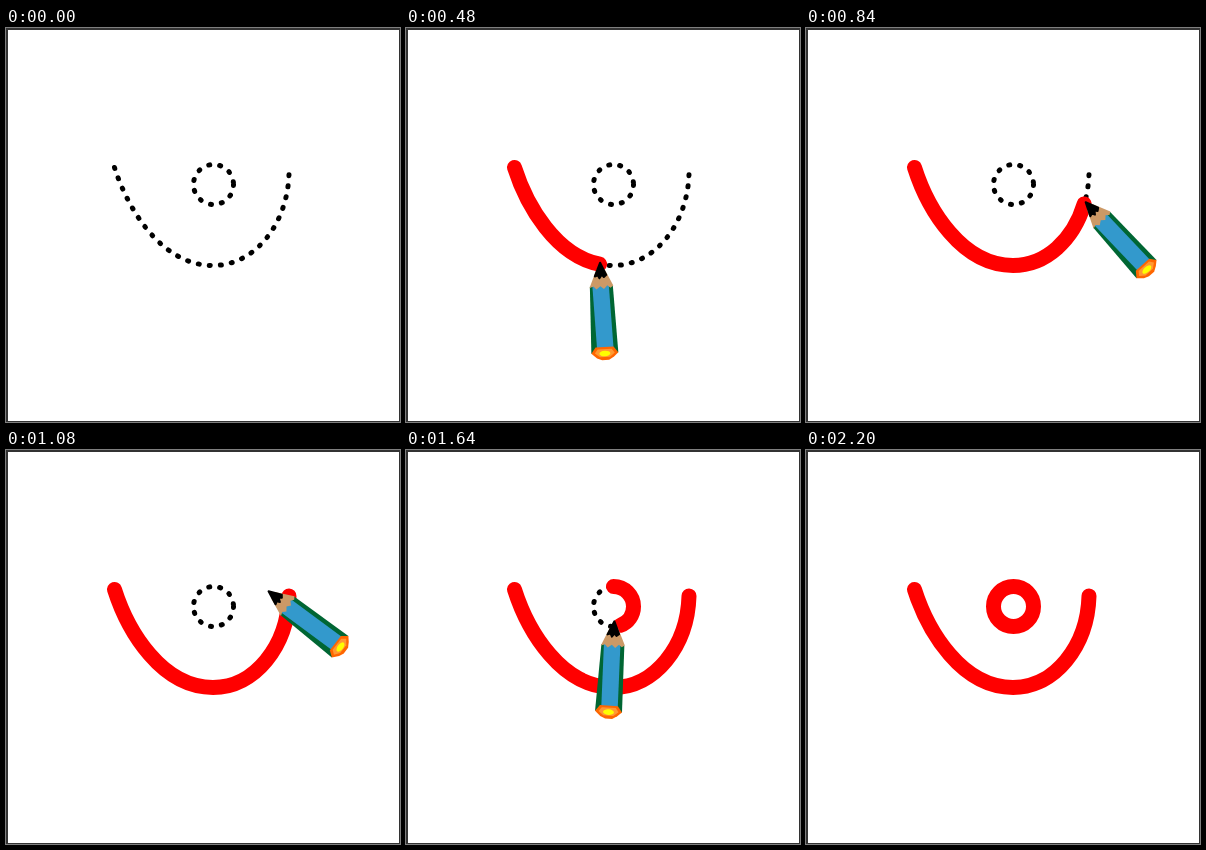
These frames come from a looping animation (394x394 px, 2240 ms). An HTML page:

```html
<!DOCTYPE html>
<html lang="en">
<head>
<meta charset="utf-8">
<title>Tracing a curve and a circle</title>
<style>
  html, body { margin: 0; width: 100%; height: 100%; overflow: hidden; background: #fff; }
  svg { display: block; width: 100vw; height: 100vh; }
  .dots { fill: none; stroke: #000; stroke-width: 5; stroke-linecap: round; stroke-dasharray: 1 10.1; }
  .ink { fill: none; stroke: #f00; stroke-width: 15; stroke-linecap: round; visibility: hidden; }
</style>
</head>
<body>
<svg viewBox="0 0 394 394">
  <defs>
    <path id="bowl" d="M108.5 139.5C122 182 156 237.5 207 237.5C249 237.5 281.5 196 283 146"/>
    <circle id="ring" cx="207.5" cy="156.5" r="20"/>
  </defs>
  <use href="#bowl" class="dots"/>
  <use href="#ring" class="dots"/>
  <path id="bowlInk" class="ink" d="M108.5 139.5C122 182 156 237.5 207 237.5C249 237.5 281.5 196 283 146"/>
  <circle id="ringInk" class="ink" cx="207.5" cy="156.5" r="20" transform="rotate(-90 207.5 156.5)"/>
  <!-- Pencil lies along +x with its tip at the origin -->
  <g id="pencil" visibility="hidden">
    <path fill="#063" d="M25-11.5L92-13.5V13.5L25 11.5Z"/>
    <path fill="#39c" d="M24-7.5L90-9V7.5L24 9Z"/>
    <path fill="#c96" d="M8-4L25-12L27-9L24.5-6L28-2.5L25 1L28 5L25 8L26.5 12L8 4Z"/>
    <path fill="#000" stroke="#000" stroke-width="2" stroke-linejoin="round" d="M1.5 0L14-5.5L16-3L13.5-1L17 1.5L14 3L15 6Z"/>
    <path fill="#f60" d="M86-9L92-13.5L96-9L99-4V3L97 8L92 13.5L86 9Z"/>
    <path fill="#f93" d="M88-7L92-10L96-5V5L92 10L88 7Z"/>
    <ellipse fill="#ff0" cx="92.5" rx="2.8" ry="5.5"/>
  </g>
  <path fill="#333" fill-rule="evenodd" d="M0 0H394V394H0ZM2 2V393H393V2Z"/>
</svg>
<script>
const STEP = 40, COUNT = 56;
const [bowl, ring, pencil] = ['bowlInk', 'ringInk', 'pencil'].map(id => document.getElementById(id));
const bowlLength = bowl.getTotalLength();
const ringLength = 2 * Math.PI * 20;

// Keys are [step, value] pairs
const bowlKeys = [[1, 0], [8, 0.291], [16, 0.672], [23.5, 1]];
const ringKeys = [[36, 0], [41, 0.44], [47, 1]];
const turnKeys = [[0, 140.5], [8, 105], [16, 69], [24, 35], [36, 46], [47, 151]];
const orbitKeys = [[35.5, -85], [41, 82], [47, 250]];
const fadeKeys = [[46, 1], [55, 0]];

function at(keys, n) {
  if (n <= keys[0][0]) return keys[0][1];
  for (let i = 1; i < keys.length; i++) {
    const [a, from] = keys[i - 1], [b, to] = keys[i];
    if (n <= b) return from + (to - from) * (n - a) / (b - a);
  }
  return keys[keys.length - 1][1];
}

function orbit(deg) {
  const a = deg * Math.PI / 180;
  return [206 + 18 * Math.cos(a), 152 + 18 * Math.sin(a)];
}

function tipAt(n) {
  if (n >= 35.5) return orbit(at(orbitKeys, n));
  const p = bowl.getPointAtLength(at(bowlKeys, n) * bowlLength);
  const start = [p.x + 0.5, p.y - 3];
  const k = at([[23.5, 0], [35.5, 1]], n);
  const goal = orbit(-85);
  return start.map((v, i) => v + (goal[i] - v) * k);
}

function reveal(shape, length, part, shown) {
  shape.style.visibility = shown ? 'visible' : 'hidden';
  shape.style.strokeDasharray = part >= 1 ? 'none' : `${Math.max(0.01, part * length)} ${length * 2}`;
}

function draw(n) {
  reveal(bowl, bowlLength, at(bowlKeys, n), n >= 1);
  reveal(ring, ringLength, at(ringKeys, n), n >= 36);
  const [x, y] = tipAt(n);
  pencil.setAttribute('transform', `translate(${x} ${y}) rotate(${at(turnKeys, n)})`);
  pencil.setAttribute('opacity', at(fadeKeys, n));
  pencil.setAttribute('visibility', n >= 1 ? 'visible' : 'hidden');
}

const begin = performance.now();
function tick() {
  draw(Math.floor((performance.now() - begin) / STEP) % COUNT);
  requestAnimationFrame(tick);
}
tick();
</script>
</body>
</html>
```
